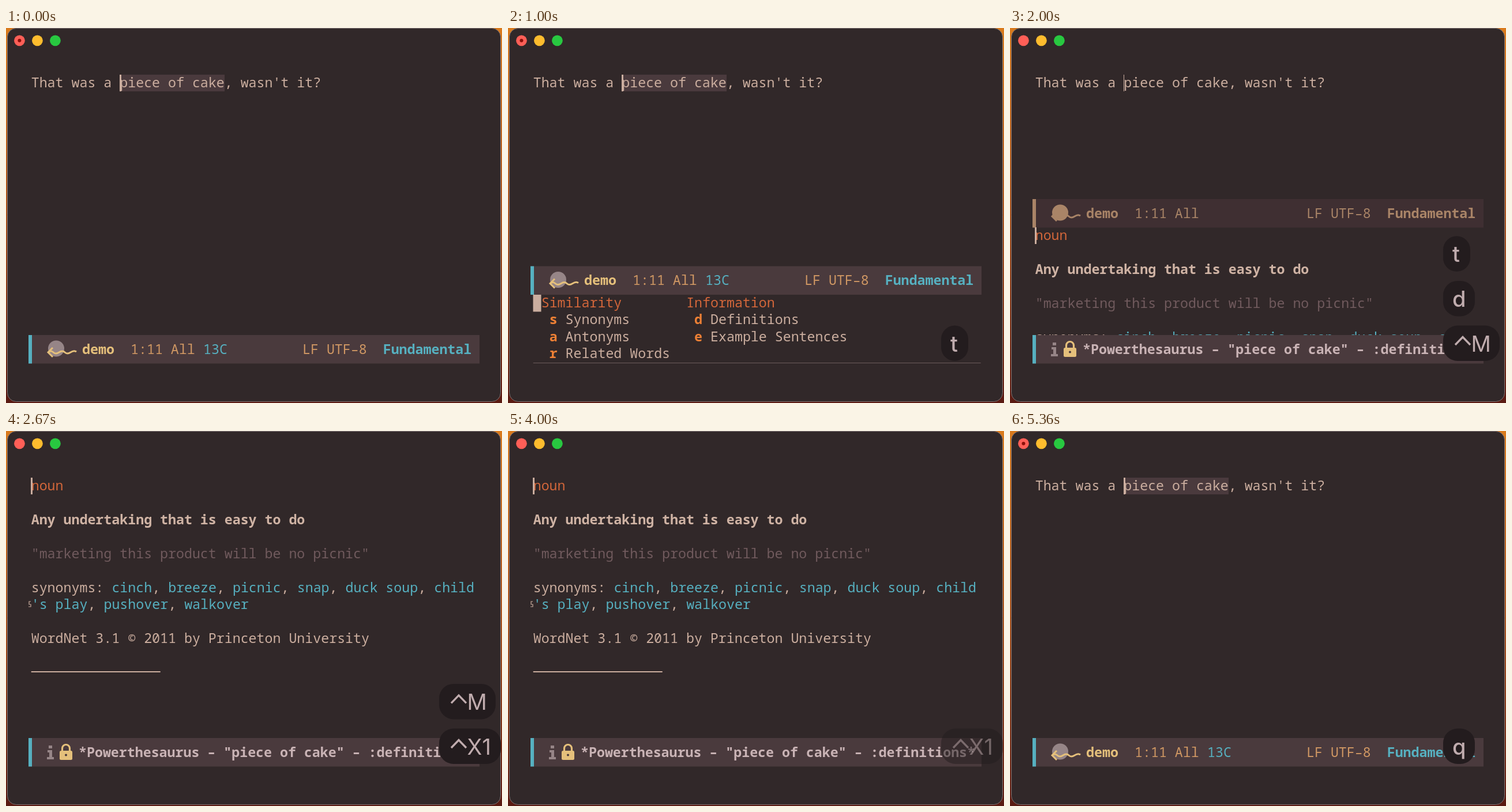
Recreate the animation shown at these times as an HTML page with a canvas. Size 860x651 px, loop 5720 ms.

```html
<!DOCTYPE html>
<html lang="en">
<head>
<meta charset="utf-8">
<title>Thesaurus lookup</title>
<style>
html, body { margin: 0; width: 100%; height: 100%; overflow: hidden; background: #312829; }
canvas { display: block; }
</style>
</head>
<body>
<canvas id="stage" width="860" height="651"></canvas>
<script>
const ctx = document.getElementById('stage').getContext('2d');
const LOOP = 5720, LEFT = 43.7, CELL = 13.97, LINE = 29.5;
const C = {
  bg: '#312829', text: '#cbae9f', strong: '#cfb3a4', dim: '#705a5d', teal: '#56b0c0',
  head: '#d2663a', key: '#ee8035', gold: '#e5c07b', tan: '#cf9763', bar: '#4a3a3d',
  barOff: '#3f2f32', off: '#a98467', title: '#c9b3b5', disc: '#968587'
};

// Key label, first shown, fading from, gone at, bubble width
const keys = [
  { label: 't', from: 1000, fade: 2330, to: 2330, width: 47 },
  { label: 'd', from: 1330, fade: 2670, to: 2670, width: 55 },
  { label: '^M', from: 2000, fade: 3330, to: 3330, width: 98 },
  { label: '^X1', from: 2670, fade: 4000, to: 4330, width: 107 },
  { label: 'q', from: 4330, fade: LOOP, to: LOOP, width: 55 }
];

function rect(x, y, w, h, color) {
  ctx.fillStyle = color;
  ctx.fillRect(x, y, w, h);
}

function disc(x, y, r, color) {
  ctx.fillStyle = color;
  ctx.beginPath();
  ctx.arc(x, y, r, 0, 2 * Math.PI);
  ctx.fill();
}

function stroke(path, color, width) {
  ctx.strokeStyle = color;
  ctx.lineWidth = width;
  ctx.stroke(new Path2D(path));
}

function write(text, column, baseline, color, weight = 500) {
  ctx.font = `${weight} 23.28px "Noto Sans Mono", monospace`;
  ctx.fillStyle = color;
  ctx.fillText(text, LEFT + column * CELL, baseline);
}

function caret(column, top, width) {
  rect(Math.round(LEFT + column * CELL - 0.5), top, width, 29, C.text);
}

function drawWindow(focused) {
  const desktop = ctx.createLinearGradient(0, 0, 0, 651);
  desktop.addColorStop(0, '#d97a1c');
  desktop.addColorStop(0.5, '#a8521c');
  desktop.addColorStop(1, '#5a1a12');
  rect(0, 0, 860, 651, desktop);
  ctx.beginPath();
  ctx.roundRect(2.5, 0.5, 855, 648, 15);
  ctx.fillStyle = C.bg;
  ctx.fill();
  ctx.strokeStyle = '#7d7273';
  ctx.lineWidth = 1;
  ctx.stroke();
  ['#ff5f57', '#febc2e', '#28c840'].forEach((color, i) => disc(23.4 + 31 * i, 21.8, 9.4, color));
  if (focused) disc(23.4, 21.8, 3, '#8c0f0a');
}

function drawSentence(selected, caretWidth) {
  if (selected) rect(198, 81, 181, 29, C.bar);
  write("That was a piece of cake, wasn't it?", 0, 102.5, C.text);
  caret(11, 81, caretWidth);
}

function modeLine(top, active) {
  rect(39, top, 782, 49.5, active ? C.bar : C.barOff);
  rect(39, top, 6, 49.5, active ? C.teal : C.off);
}

function demoLine(top, active = true) {
  const tint = color => active ? color : C.off;
  const base = top + 32.5;
  modeLine(top, active);
  ctx.save();
  ctx.translate(0, top);
  disc(87, 23.5, 14, tint(C.disc));
  stroke('M81 22 L73 30 L81 38 M73 30 Q78 26 82 30 T92 30 T102 30 T112 30 T122 29', tint(C.gold), 3);
  ctx.restore();
  const place = (text, x, color, weight) => write(text, (x - LEFT) / CELL, base, tint(color), weight);
  place('demo', 132, C.gold, 700);
  place('1:11 All', 216, C.tan);
  if (active) place('13C', 342, C.teal);
  place('LF UTF–8', 514, C.tan);
  place('Fundamental', 653.7, C.teal, 700);
}

function resultLine() {
  modeLine(533, true);
  for (const [x, y, w, h] of [[74, 546, 6, 5], [72, 554, 8, 4], [75, 554, 5, 14], [71, 566, 12, 4]])
    rect(x, y, w, h, C.disc);
  stroke('M97.5 557 V551 A6.5 6.5 0 0 1 110.5 551 V557', C.gold, 3.2);
  ctx.beginPath();
  ctx.roundRect(93, 555, 22, 16, 2.5);
  ctx.fillStyle = C.gold;
  ctx.fill();
  disc(104, 562.5, 2, C.bar);
  write('*Powerthesaurus – "piece of cake" – :definitions*', (126 - LEFT) / CELL, 565.5, C.title, 700);
}

function drawMenu() {
  demoLine(413.5);
  rect(43.5, 463, 14, 29.5, C.text);
  const columns = [
    [1, 'Similarity', ['s', 'Synonyms'], ['a', 'Antonyms'], ['r', 'Related Words']],
    [19, 'Information', ['d', 'Definitions'], ['e', 'Example Sentences']]
  ];
  for (const [column, title, ...items] of columns) {
    write(title, column, 484.5, C.head);
    const indent = column === 1 ? 2 : 20;
    items.forEach(([key, name], i) => {
      const base = 484.5 + LINE * (i + 1);
      write(key, indent, base, C.key, 700);
      write(name, indent + 2, base, C.text);
    });
  }
  rect(LEFT, 581, 776, 1, '#6d5c5c');
}

function drawWords(words, column, base) {
  for (const part of words.split(/(, )/)) {
    write(part, column, base, part === ', ' ? C.text : C.teal);
    column += part.length;
  }
}

function drawDefinition(firstBase) {
  const base = row => firstBase + row * LINE;
  write('noun', 0, base(0), C.head);
  caret(0, Math.round(firstBase - 22), 3);
  write('Any undertaking that is easy to do', 0, base(2), C.strong, 700);
  write('"marketing this product will be no picnic"', 0, base(4), C.dim);
  write('synonyms: ', 0, base(6), C.text);
  drawWords('cinch, breeze, picnic, snap, duck soup, child', 10, base(6));
}

function drawDefinitionEnd() {
  drawWords("'s play, pushover, walkover", 0, 309);
  stroke('M43 296 H40 V301 H43 V305 H39', C.text, 1.2);
  write('WordNet 3.1 © 2011 by Princeton University', 0, 368, C.text);
  rect(LEFT, 417, 224, 2, C.text);
}

function drawKeys(time) {
  const live = keys.filter(k => time >= k.from && time < k.to).reverse();
  live.forEach((k, row) => {
    const control = k.label[0] === '^';
    ctx.save();
    ctx.globalAlpha = time >= k.fade ? 0.5 : 1;
    ctx.translate(751, 516.5 - 77.6 * row);
    ctx.beginPath();
    ctx.roundRect(0, 0, k.width, 61.5, k.width < 50 ? 23.5 : 25);
    ctx.fillStyle = '#231c1e';
    ctx.fill();
    ctx.fillStyle = '#c0acae';
    ctx.font = `${control ? 400 : 500} 38px Inter, "Liberation Sans", sans-serif`;
    if (control) stroke('M21 33.5 L34 20 L47 33.5', '#c0acae', 3.4);
    ctx.fillText(control ? k.label.slice(1) : k.label, control ? 48.5 : 16, 45);
    ctx.restore();
  });
}

function draw(time) {
  const idle = time < 1000 || time >= 4330;
  drawWindow(time < 1330 || idle);
  if (idle) {
    drawSentence(true, 3);
    demoLine(533);
  } else if (time < 1330) {
    drawSentence(true, 3);
    drawMenu();
  } else if (time < 2000) {
    drawSentence(true, 1);
    demoLine(533);
    write('Term:', 0, 604.5, C.teal);
    write('piece of cake', 6, 604.5, C.text);
    caret(19, 583, 3);
  } else if (time < 2670) {
    drawSentence(false, 1);
    demoLine(297, false);
    drawDefinition(368);
    resultLine();
  } else {
    drawDefinition(102.5);
    drawDefinitionEnd();
    resultLine();
  }
  drawKeys(time);
}

function tick() {
  draw(performance.now() % LOOP);
  requestAnimationFrame(tick);
}
tick();
</script>
</body>
</html>
```
